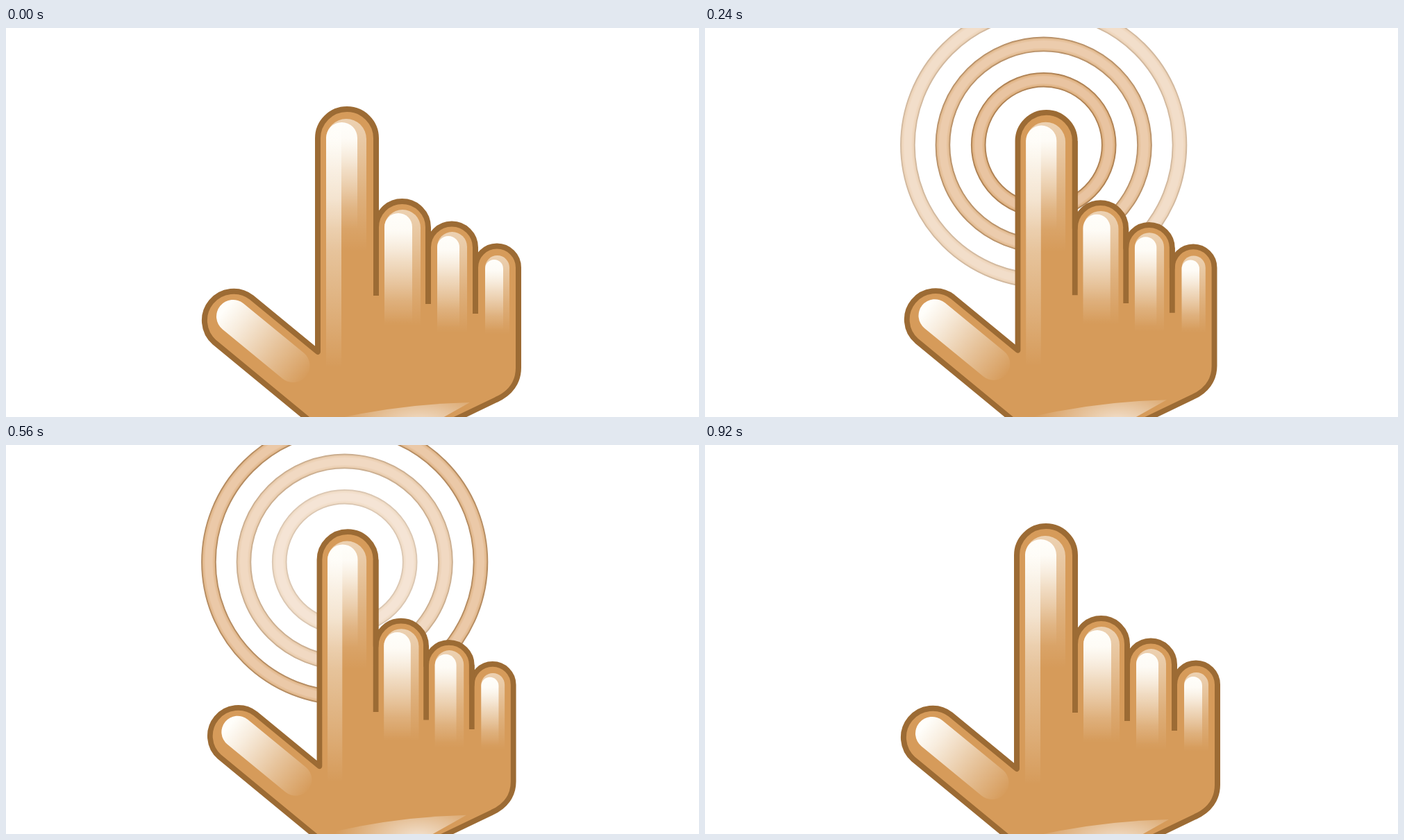
An HTML page for the animation above (960 ms loop, 998 px wide and 561 px high).

```html
<!DOCTYPE html>
<html lang="en">
<head>
<meta charset="utf-8">
<title>Tapping hand</title>
<style>
  html, body { margin: 0; width: 100%; height: 100%; overflow: hidden; background: #fff; }
  svg { display: block; width: 100%; height: 100%; }
</style>
</head>
<body>
<svg viewBox="0 0 998 561">
  <defs id="defs">
    <radialGradient id="palm" gradientUnits="userSpaceOnUse" cx="0" cy="0" r="1"
      gradientTransform="translate(596 574) scale(125 62)">
      <stop offset="0" stop-color="#fff" stop-opacity=".72"/>
      <stop offset=".5" stop-color="#fff" stop-opacity=".36"/>
      <stop offset="1" stop-color="#fff" stop-opacity="0"/>
    </radialGradient>
    <linearGradient id="thumb" gradientUnits="userSpaceOnUse" x1="-16" y1="0" x2="138" y2="0">
      <stop offset="0" stop-color="#fffefa"/>
      <stop offset=".2" stop-color="#fffefa" stop-opacity=".82"/>
      <stop offset=".6" stop-color="#fffefa" stop-opacity=".4"/>
      <stop offset="1" stop-color="#fffefa" stop-opacity="0"/>
    </linearGradient>
  </defs>
  <g id="rings" fill="none"></g>
  <g id="hand">
    <path fill="#d69b5a" stroke="#9c6b34" stroke-width="8" stroke-linejoin="round"
      d="M478 600L300.3 453.4A42 42 0 0 1 353.7 388.6L449 467V159A42 42 0 0 1 533 159V287.5
         A37.5 37.5 0 0 1 608 287.5V316.5A34 34 0 0 1 676 316.5V345.5A31 31 0 0 1 738 345.5V490
         C738 511 726 527 706 536L573 600Z"/>
    <path fill="none" stroke="#9c6b34" stroke-width="8" d="M533 159V386M608 287V398M676 316V412"/>
    <path fill="url(#palm)" d="M420 578Q540 543 668 540L604 576Z"/>
    <rect fill="url(#thumb)" transform="translate(327 416) rotate(39.4)"
      x="-24" y="-24" width="160" height="48" rx="24"/>
    <g id="shine"></g>
  </g>
</svg>
<script>
const NS = 'http://www.w3.org/2000/svg';
const byId = id => document.getElementById(id);

function add(parent, tag, attrs) {
  const el = document.createElementNS(NS, tag);
  for (const k in attrs) el.setAttribute(k, attrs[k]);
  parent.appendChild(el);
  return el;
}

let fades = 0;
// Vertical fade; stops are [offset, opacity]
function fade(y1, y2, stops) {
  const id = 'fade' + fades++;
  const g = add(byId('defs'), 'linearGradient',
    { id, gradientUnits: 'userSpaceOnUse', x1: 0, x2: 0, y1, y2 });
  for (const [offset, o] of stops)
    add(g, 'stop', { offset, 'stop-color': '#fffefa', 'stop-opacity': o });
  return `url(#${id})`;
}

// Round-topped column of light
function column(x, top, w, end, stops) {
  const r = w / 2;
  add(byId('shine'), 'path', {
    d: `M${x} ${end}V${top + r}a${r} ${r} 0 0 1 ${w} 0V${end}Z`,
    fill: fade(top, end, stops)
  });
}

const SOFT = [[0, .55], [.25, .42], [.6, .2], [1, 0]];
const BRIGHT = [[0, 1], [.15, .95], [.45, .5], [.8, .12], [1, 0]];

column(461, 131, 58, 322, SOFT);
column(461, 136, 45, 290, BRIGHT);
add(byId('shine'), 'path', {
  d: 'M461 490V158.5A22.5 22.5 0 0 1 483 142V490Z',
  fill: fade(142, 490, [[0, .5], [.3, .58], [.55, .38], [.8, .18], [1, 0]])
});
column(545, 262, 52, 430, SOFT);
column(545, 267, 40, 425, BRIGHT);
column(621, 294, 43, 440, SOFT);
column(621, 300, 32, 432, BRIGHT);
column(690, 328, 35, 442, SOFT);
column(690, 334, 26, 436, BRIGHT);

const rings = [94, 145.3, 195.8].map(r => {
  const g = add(byId('rings'), 'g', {});
  for (const [stroke, w] of [['#a06c37', 21.6], ['#d9a46a', 18], ['#e0b080', 15], ['#e6bb92', 11]])
    add(g, 'circle', { cx: 487.7, cy: 168.7, r, stroke, 'stroke-width': w });
  return g;
});

const STEP = 40, STEPS = 24;
const KEYS = [0, 4, 8, 12, 14, 19, 23];
const GLOW = [
  [0, 1, .72, .47, .38, .25, 0],
  [0, .49, 1, .7, .55, .25, 0],
  [0, .31, .65, 1, .79, .25, 0]
];

function at(values, n) {
  let i = 1;
  while (n > KEYS[i]) i++;
  const k = (n - KEYS[i - 1]) / (KEYS[i] - KEYS[i - 1]);
  return values[i - 1] + (values[i] - values[i - 1]) * k;
}

function draw(ms) {
  const n = Math.floor(ms / STEP) % STEPS;
  const press = n <= 12 ? n / 12 : (23 - n) / 11;
  const s = 1 - .0412 * press;
  byId('hand').setAttribute('transform',
    `translate(521.5 355) scale(${s}) translate(-521.5 -355)`);
  rings.forEach((g, i) => g.setAttribute('opacity', at(GLOW[i], n)));
}

function tick() {
  draw(performance.now());
  requestAnimationFrame(tick);
}
tick();
</script>
</body>
</html>
```
